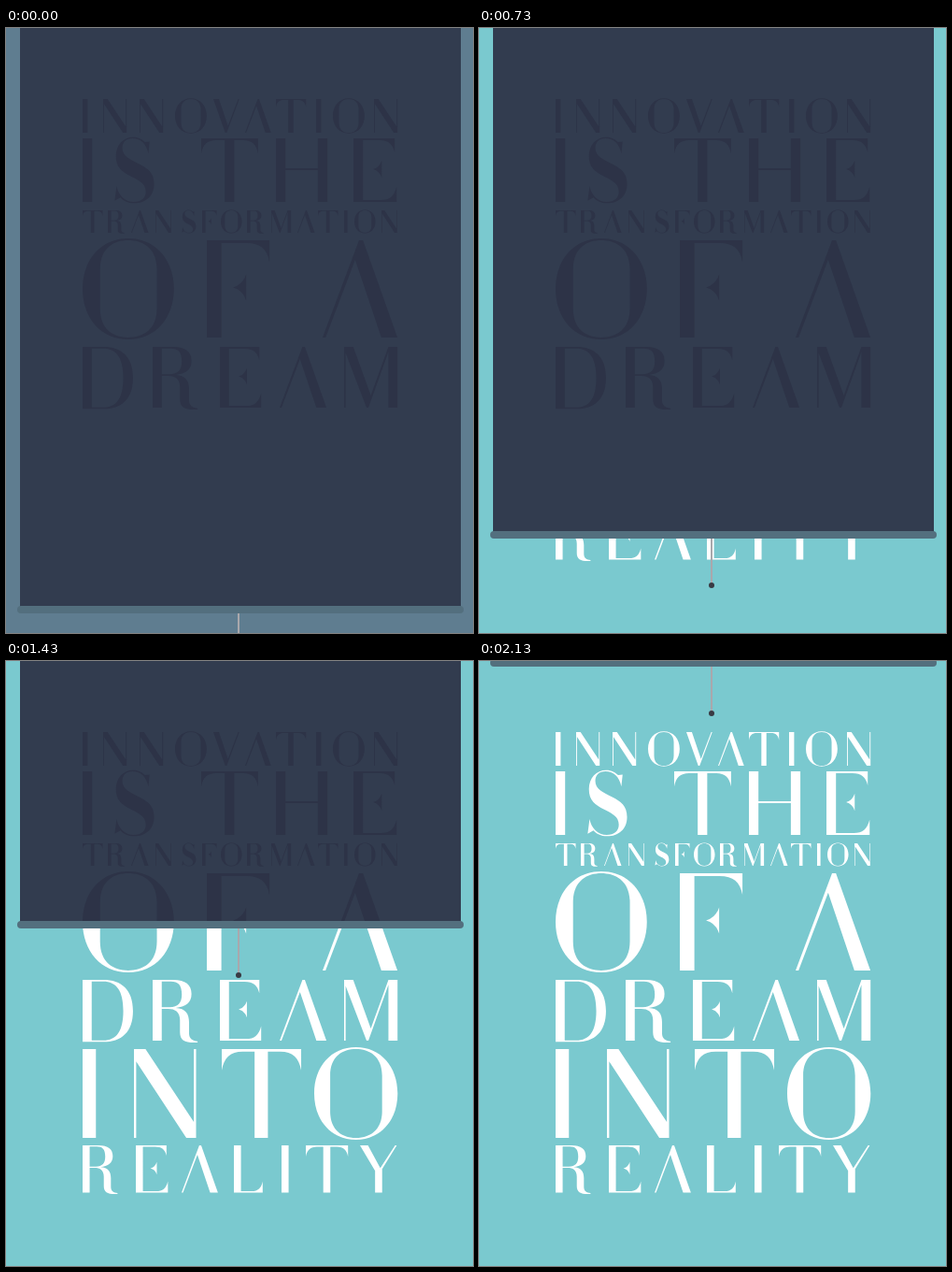
Recreate the animation shown at these times as an HTML page. Size 500 by 647 pixels, loop 4130 ms.

```html
<!DOCTYPE html>
<html lang="en">
<head>
<meta charset="utf-8">
<title>Innovation is the transformation of a dream into reality</title>
<style>
  html, body { margin: 0; width: 100%; height: 100%; overflow: hidden; }
  .stage {
    position: relative; width: 500px; height: 647px; overflow: hidden;
    animation: light 4130ms step-end infinite;
  }
  svg { position: absolute; top: 0; left: 0; width: 500px; height: 647px; fill-rule: evenodd; }
  .blind {
    position: absolute; top: 0; left: 0; width: 500px;
    animation: raise 4130ms step-end infinite;
  }
  .panel {
    position: absolute; top: 0; bottom: 4px; left: 15px; width: 472px;
    overflow: hidden; background: #323c4f;
  }
  .panel svg { left: -15px; }
  .bar {
    position: absolute; bottom: 0; left: 12px; width: 478px; height: 8px;
    border-radius: 4px; background: #536f7e;
  }
  .cord { position: absolute; top: 100%; left: 248px; width: 2px; height: 50px; background: #a9a8ac; }
  .cord::after {
    content: ""; position: absolute; left: -2px; bottom: -3px;
    width: 6px; height: 6px; border-radius: 50%; background: #393a43;
  }

  /* height = lower edge of the bar */
  @keyframes raise {
    0%     { height: 626px; }
    14.28% { height: 606px; }
    15.98% { height: 576px; animation-timing-function: steps(2); }
    19.37% { height: 516px; }
    22.76% { height: 486px; animation-timing-function: steps(6); }
    32.92% { height: 306px; }
    34.62% { height: 286px; animation-timing-function: steps(9); }
    49.87% { height: 16px; }
    51.57%, 100% { height: 6px; }
  }
  @keyframes light {
    0%     { background: rgb(95, 125, 144); }
    3.87%  { background: rgb(101, 141, 157); animation-timing-function: steps(3); }
    11.13% { background: rgb(118, 189, 196); }
    14.28%, 100% { background: rgb(122, 201, 207); }
  }
</style>
</head>
<body>
<div class="stage">
  <svg id="bright" fill="#fff" role="img" aria-label="Innovation is the transformation of a dream into reality"></svg>
  <div class="blind">
    <div class="panel"><svg id="dim" fill="#2d3347" aria-hidden="true"></svg></div>
    <div class="cord"></div>
    <div class="bar"></div>
  </div>
</div>
<script>
  // Detached middle arm of E and F
  const spark = x => `M${x} 48.5q10-2.5 13.5-13.5v27q-3.5-11-13.5-13.5Z`;

  // Letterforms on a cap height of 100, baseline at y = 100
  const glyphs = {
    A: 'M0 100L37.5 0H41.5L77 100H60.5L33.5 20L3 100Z',
    D: 'M0 0H34C64 0 83 16 83 51S64 102 34 102H0ZM15 2.5V99.5H34C56 99.5 67 84 67 51S56 2.5 34 2.5Z',
    E: 'M0 0H65V22C62 9 55 3 41 3H15V97H43C57 97 64 91 68 76V100H0Z' + spark(31),
    F: 'M0 0H64.5V22C62 9 55 3 41 3H15V100H0Z' + spark(27),
    H: 'M0 0H15V47H66V0H81V100H66V50H15V100H0Z',
    I: 'M0 0H15V100H0Z',
    L: 'M0 0H15V97H38C51 97 58 90 61 76V100H0Z',
    M: 'M0 0H15L44 80L73 0H88V100H73V8L40 100H37L2.5 10V100H0Z',
    N: 'M0 0H13L67.5 82V0H70V100H59L2.5 14V100H0Z',
    O: 'M47-2C75-2 94 20 94 50S75 102 47 102S0 80 0 50S19-2 47-2Z' +
       'M18 30V70C18 92 32 100 47 100S76.5 92 76.5 70V30C76.5 8 62 0 47 0S18 8 18 30Z',
    R: 'M0 0H34C54 0 64 8 64 23C64 38 54 44 38 46C54 47 60 55 60 70V88C60 97 66 100 74 101V103' +
       'C54 104 45 100 45 86V66C45 52 36 47.5 26 47.5H15V45H28C42 45 48 38 48 24' +
       'C48 8 42 2.5 30 2.5H15V100H0Z',
    S: 'M57 5L55 24C52 8 42 0 30 0C20 0 14 6 14 15C14 28 26 33 40 40C54 47 64 54 64 72' +
       'C64 91 50 102 33 102C22 102 16 98 11 93L2 98L5 75C8 90 18 100 32 100C44 100 51 94 51 84' +
       'C51 71 40 66 28 60C14 53 4 46 4 28C4 10 16-2 31-2C40-2 46 2 50 6Z',
    T: 'M0 0H89.5V24C87 10 80 3 66 3H52V100H37V3H23.5C9.5 3 2.5 10 0 24Z',
    V: 'M77 0L39.5 100H35.5L0 0H16.5L43.5 80L74 0Z',
    Y: 'M0 0H17L43 48L74.5 0H78L47 50V100H32V54Z'
  };

  // Letters, top, cap height, left edge of each letter
  const lines = [
    ['INNOVATION', 76, 36, [82, 104, 143, 181, 222, 256, 289, 332, 350, 394]],
    ['ISTHE', 118, 68, [82, 115, 209, 289, 372]],
    ['TRANSFORMATION', 195, 24, [82, 109, 134, 160, 188, 210, 230, 258, 284, 312, 334, 362, 373, 402]],
    ['OFA', 227, 104, [82, 215, 339]],
    ['DREAM', 341, 65, [82, 157, 229, 293, 362]],
    ['INTO', 415, 95, [82, 137, 231, 330]],
    ['REALITY', 518, 50.5, [82, 139, 188, 244, 295, 321, 379]]
  ];

  const setLine = ([letters, top, size, lefts]) => lefts.map((x, i) =>
    `<path transform="translate(${x} ${top}) scale(${size / 100})" d="${glyphs[letters[i]]}"/>`).join('');

  const draw = (id, part) => document.getElementById(id).innerHTML = part.map(setLine).join('');

  draw('bright', lines);
  draw('dim', lines.slice(0, 5));
</script>
</body>
</html>
```
